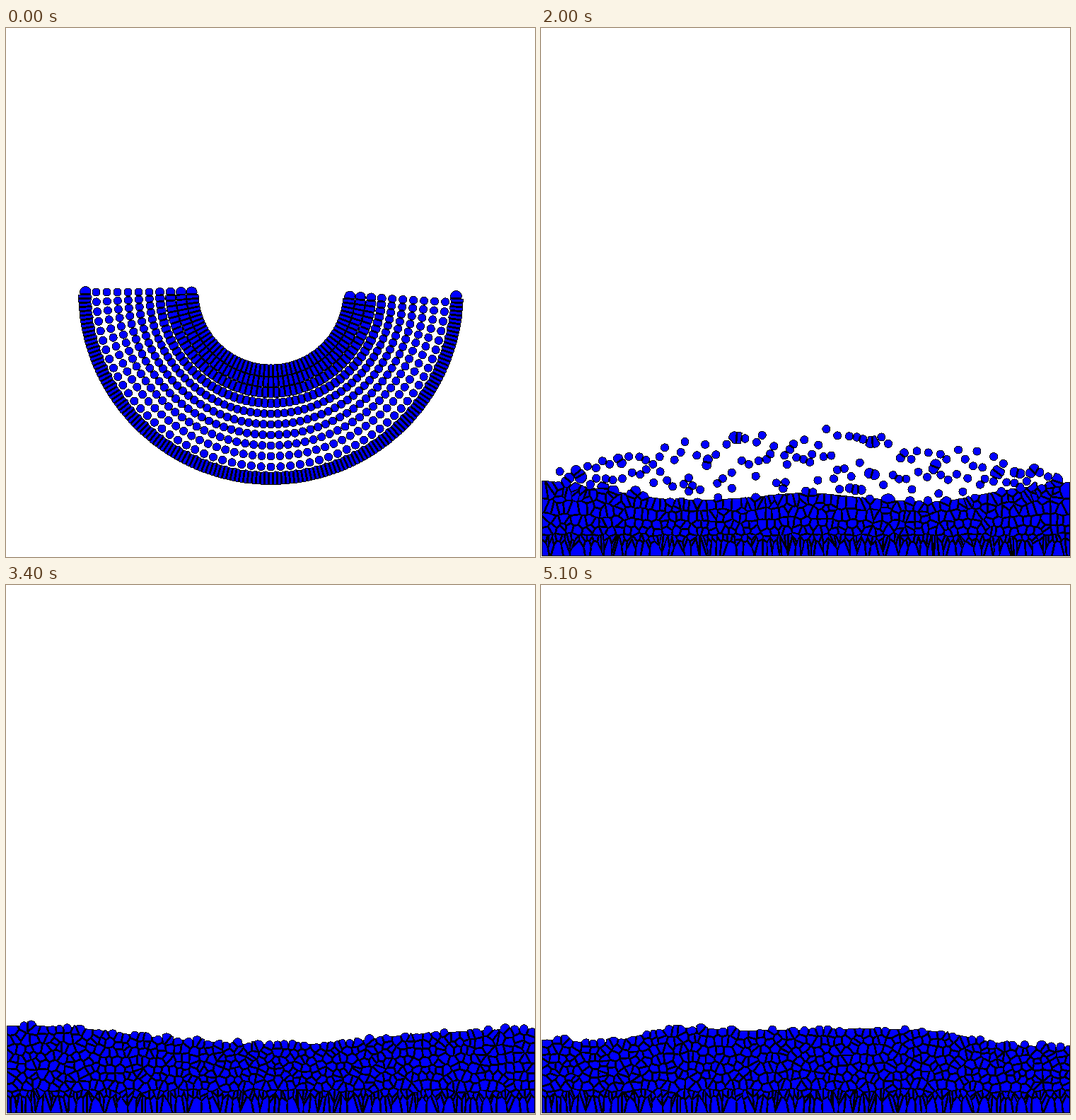
An HTML page with a canvas that plays this animation: 748 px wide and 748 px high, repeating every 5200 ms.

```html
<!DOCTYPE html>
<html>
<head>
<meta charset="utf-8">
<style>
html, body { margin: 0; width: 100%; height: 100%; overflow: hidden; background: #fff; }
canvas { display: block; }
</style>
</head>
<body>
<canvas id="stage" width="748" height="748"></canvas>
<script>
const SIZE = 748, FLOOR = 746, STEP_MS = 100, STEPS = 52;
const COLUMNS = 70, PER_COLUMN = 10, GROUNDED = 3, ROWS = PER_COLUMN - GROUNDED;
const REACH = 32, WALL = 1.4;
const WHITE = 0xffffffff, BLACK = 0xff000000, BLUE = 0xffff0000;

// Surface heights at nine places across the tank, one row every four steps from SPLASH on.
const SPLASH = 14;
const WAVES = [
  [90, 108, 141, 146, 142, 145, 136, 105, 90],
  [60, 90, 95, 100, 105, 100, 95, 90, 60],
  [160, 100, 70, 70, 80, 70, 65, 100, 155],
  [163, 96, 50, 57, 76, 63, 52, 101, 157],
  [142, 120, 85, 75, 80, 75, 85, 118, 137],
  [125, 122, 111, 102, 98, 100, 111, 117, 121],
  [110, 112, 110, 108, 105, 108, 110, 112, 106],
  [88, 95, 105, 100, 108, 112, 100, 95, 75],
  [84, 98, 117, 114, 112, 116, 116, 96, 80],
  [105, 102, 121, 118, 119, 120, 116, 99, 94]
];

const clamp = (v, lo, hi) => Math.max(lo, Math.min(hi, v));
const mix = (a, b, f) => a + (b - a) * f;
const smooth = f => { f = clamp(f, 0, 1); return f * f * (3 - 2 * f); };

let seed = 7;
const random = () => (seed = seed * 16807 % 2147483647) / 2147483647;

function spline(values, p) {
  const last = values.length - 1;
  p = clamp(p, 0, last);
  const i = Math.min(Math.floor(p), last - 1), f = p - i;
  const [a, b, c, d] = [-1, 0, 1, 2].map(k => values[clamp(i + k, 0, last)]);
  return b + f / 2 * (c - a + f * (2 * a - 5 * b + 4 * c - d + f * (3 * (b - c) + d - a)));
}

function arcPosition(p, t) {
  const { ring, i, n, radius } = p;
  const grow = (Math.min(t, 7) / 7) ** 2;
  const push = ring === 10 ? 9 : 8 * Math.exp(-ring / 2.5);
  const ends = Math.exp(-i / 4) - Math.exp((i + 1 - n) / 4);
  const angle = Math.PI * i / n - grow * push * ends / radius;
  const zigzag = ring === 10 ? 4 : ring === 0 ? 5 : ring === 1 ? 4 * Math.sin(angle) ** 4 : 0;
  const r = radius + grow * zigzag * (i % 2 ? 1 : -1);
  return [374 - r * Math.cos(angle), 373 + r * Math.sin(angle) + 2.93 * t * (t + 1) / 2];
}

function makeParticles() {
  const list = [];
  for (let ring = 0; ring <= 10; ring++) {
    const n = ring === 10 ? 140 : 56;
    for (let i = 0; i < n; i++) {
      const p = { ring, i, n, radius: 112 + 15 * ring };
      [p.x0, p.y0] = arcPosition(p, 0);
      list.push(p);
    }
  }
  list.sort((a, b) => a.x0 - b.x0);
  for (let col = 0; col < COLUMNS; col++) {
    const column = list.slice(col * PER_COLUMN, (col + 1) * PER_COLUMN);
    column.sort((a, b) => b.y0 - a.y0).forEach((p, k) => {
      const row = k - GROUNDED;
      p.grounded = row < 0;
      const offset = p.grounded ? (k + random()) / GROUNDED : 0.5 * (k % 2) + 0.9 * random() - 0.2;
      p.u = clamp((col + offset) / COLUMNS, 0.003, 0.997);
      p.v = (k + 0.1 + 0.8 * random()) / PER_COLUMN;
      p.rowV = (row + 0.1 + 0.8 * random()) / ROWS;
      p.lift = 18 + 7 * random();
      p.droplet = row >= 2 && row % 2 === 0;
      p.depth = ((6 - row) / 2 + random()) / 3;
    });
  }
  return list;
}

// Shape of the pool at time t: height at x, and x for a share u of the volume or width.
function makePool(t) {
  const p = (t - SPLASH) / 4, spread = smooth(p), walled = t > 18;
  const left = walled ? -70 : mix(42, 13, spread);
  const right = walled ? SIZE + 70 : mix(704, 729, spread);
  const round = mix(65, 25, spread);
  const wave = WAVES[0].map((_, i) => spline(WAVES.map(row => row[i]), p));
  const height = x => {
    const d = clamp(Math.min(x - left, right - x) / round, 0, 1);
    return spline(wave, x / SIZE * 8) * Math.sqrt(1 - (1 - d) ** 2);
  };
  const sums = [0];
  for (let x = 2; x < SIZE; x += 4) sums.push(sums[sums.length - 1] + height(x));
  const byVolume = u => {
    const goal = u * sums[sums.length - 1];
    let i = 1;
    while (i < sums.length - 1 && sums[i] < goal) i++;
    return 4 * (i - 1 + (goal - sums[i - 1]) / (sums[i] - sums[i - 1] || 1));
  };
  const byWidth = u => mix(Math.max(0, left), Math.min(SIZE, right), u);
  return { height, byVolume, byWidth };
}

function poolPosition(p, t, pool) {
  const settled = smooth((t - SPLASH) / 8);
  const even = p.grounded || p.droplet ? settled : 0;
  const gather = p.droplet ? Math.exp(-(((t - 25) / 5) ** 2)) : 0;
  const share = mix(p.u, 0.08 + 0.84 * p.u, gather);
  const x = mix(pool.byVolume(p.u), pool.byWidth(share), even);
  const h = pool.height(x), gap = Math.min(32, 0.42 * h);
  const rest = p.grounded ? Math.min(p.lift, 0.3 * h) : gap + p.rowV * (h - gap);
  let y = FLOOR - 1 - mix(p.v * h, rest, settled);
  if (p.droplet) {
    const crest = 540 + 0.0005 * (x - 374) ** 2;
    const range = clamp(FLOOR - h - crest, 30, 145);
    const side = Math.min(Math.abs(x - 205), Math.abs(x - 550));
    const first = crest + range * p.depth + 1.25 * (t - 24.5) ** 2;
    const second = 604 + 0.3 * side + 45 * p.depth + 1.25 * (t - 43.5) ** 2;
    y = Math.min(y, first, second);
  }
  return [x, y];
}

function place(p, t, pool) {
  if (t >= SPLASH) return poolPosition(p, t, pool);
  const [x, y] = arcPosition(p, t);
  if (t < 8) return [x, y];
  const start = 8 + 4 * (635 - p.y0) / 272;
  const f = smooth((t - start) / (SPLASH - start));
  const [px, py] = poolPosition(p, SPLASH, pool);
  return [mix(x, px, f), mix(Math.min(y, FLOOR - 1 - 60 * p.v), py, f)];
}

// Crowded particles get larger discs.
function discRadii(points) {
  const radii = points.map(() => 6);
  for (let i = 0; i < points.length; i++) {
    for (let j = 0; j < i; j++) {
      const dx = points[i][0] - points[j][0];
      if (Math.abs(dx) > 9.5) continue;
      const d = Math.hypot(dx, points[i][1] - points[j][1]);
      if (d < 9.5) {
        const add = 6 * (1 - d / 9.5);
        radii[i] += add;
        radii[j] += add;
      }
    }
  }
  return radii.map(r => Math.min(r, 11));
}

const ctx = document.getElementById("stage").getContext("2d");
const image = ctx.createImageData(SIZE, SIZE);
const pixels = new Uint32Array(image.data.buffer);
const COUNT = SIZE * SIZE;
const dist1 = new Float32Array(COUNT), dist2 = new Float32Array(COUNT);
const id1 = new Int16Array(COUNT), id2 = new Int16Array(COUNT);
const inside = new Uint8Array(COUNT);
const particles = makeParticles();

function findNearest(points) {
  dist1.fill(Infinity);
  dist2.fill(Infinity);
  points.forEach(([px, py], id) => {
    const x0 = Math.max(0, Math.ceil(px - REACH)), x1 = Math.min(SIZE - 1, px + REACH);
    const y0 = Math.max(0, Math.ceil(py - REACH)), y1 = Math.min(SIZE - 1, py + REACH);
    for (let y = y0; y <= y1; y++) {
      for (let x = x0; x <= x1; x++) {
        const d = (x - px) ** 2 + (y - py) ** 2, k = y * SIZE + x;
        if (d < dist1[k]) {
          dist2[k] = dist1[k];
          id2[k] = id1[k];
          dist1[k] = d;
          id1[k] = id;
        } else if (d < dist2[k]) {
          dist2[k] = d;
          id2[k] = id;
        }
      }
    }
  });
}

function onWall(k, points) {
  if (dist2[k] === Infinity) return false;
  const a = points[id1[k]], b = points[id2[k]];
  return dist2[k] - dist1[k] < 2 * WALL * Math.hypot(a[0] - b[0], a[1] - b[1]);
}

function draw(t) {
  const pool = makePool(Math.max(t, SPLASH));
  const points = particles.map(p => place(p, t, pool));
  const radii = discRadii(points);
  findNearest(points);
  inside.fill(0);
  for (let x = 1; x < SIZE; x++) {
    const top = t >= SPLASH ? FLOOR - pool.height(x) + 1 : SIZE;
    for (let y = 0; y <= FLOOR; y++) {
      const k = y * SIZE + x;
      inside[k] = y > top || dist1[k] < Infinity && dist1[k] < radii[id1[k]] ** 2 ? 1 : 0;
    }
  }
  for (let k = 0; k < COUNT; k++) {
    if (!inside[k]) pixels[k] = WHITE;
    else {
      const rim = !(inside[k - 1] && inside[k + 1] && inside[k - SIZE] && inside[k + SIZE]);
      pixels[k] = rim || onWall(k, points) ? BLACK : BLUE;
    }
  }
  ctx.putImageData(image, 0, 0);
}

let shown = -1;
function tick() {
  const t = Math.floor(performance.now() / STEP_MS) % STEPS;
  if (t !== shown) draw(shown = t);
  requestAnimationFrame(tick);
}
tick();
</script>
</body>
</html>
```
